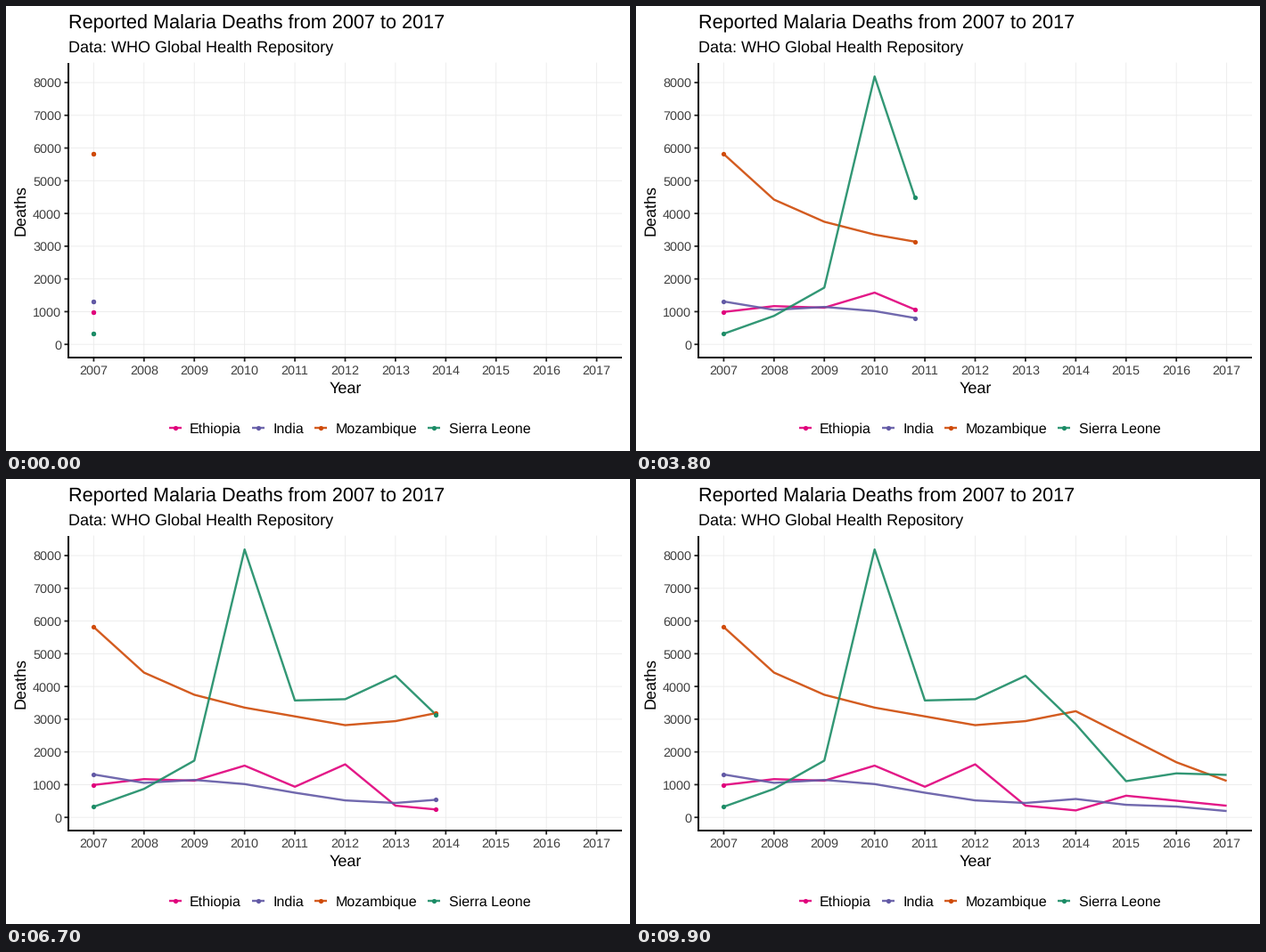
Animation of 700x500 px, one loop 10000 ms. Source, as a matplotlib script:

```python
import matplotlib.pyplot as plt
import numpy as np
from matplotlib.animation import FuncAnimation

W, H, DPI = 700, 500, 100
FRAMES = 100
PT = 72 / DPI  # pixels to points

plt.rcParams["font.family"] = "Liberation Sans"
plt.rcParams["text.hinting"] = "none"

LEFT, RIGHT, TOP, BOTTOM = 70, 691, 63.6, 395
YEARS = np.arange(2007, 2018)
SERIES = {
    "Ethiopia": ("#e0007b", 206.1, [991, 1169, 1121, 1581, 936, 1621, 358,
                                    213, 662, 510, 356]),
    "India": ("#6259a5", 299.6, [1311, 1055, 1144, 1018, 754, 519, 440,
                                 562, 384, 331, 194]),
    "Mozambique": ("#cf4a08", 369.8, [5816, 4424, 3747, 3354, 3086, 2818, 2941,
                                      3245, 2467, 1685, 1114]),
    "Sierra Leone": ("#1c8c66", 496.8, [324, 871, 1734, 8188, 3573, 3611, 4326,
                                        2848, 1107, 1345, 1298]),
}
# Each year is reached on a whole frame.
KNOTS = np.floor(np.arange(len(YEARS)) * (FRAMES - 1) / 10 + 0.5)


def px(year):
    return 98.4 + 56.42 * (np.asarray(year) - 2007)


def py(deaths):
    return 380.2 - 0.03677 * np.asarray(deaths)


fig = plt.figure(figsize=(W / DPI, H / DPI), dpi=DPI, facecolor="white")
ax = fig.add_axes([0, 0, 1, 1])
ax.set(xlim=(0, W), ylim=(H, 0))
ax.axis("off")


def stroke(xs, ys, color, width, **kw):
    kw.setdefault("solid_capstyle", "butt")
    return ax.plot(xs, ys, color=color, lw=width * PT, **kw)[0]


def label(x, y, text, size, color="black", **kw):
    ax.text(x, y, text, fontsize=size * PT, color=color, va="baseline", **kw)


def dot(x, y, color, z=6):
    return ax.plot([x], [y], "o", color=color, ms=5.2 * PT, mew=0, zorder=z)[0]


def trace(xs, ys, color):
    return stroke(xs, ys, color, 2.4, alpha=0.9, zorder=5,
                  solid_joinstyle="round")


GRID, TICK, GREY = "#ebebeb", "#222222", "#404040"
for year in YEARS:
    x = px(year)
    stroke([x, x], [TOP, BOTTOM], GRID, 0.85, zorder=1, snap=False)
    stroke([x, x], [BOTTOM, BOTTOM + 4.5], TICK, 1.8, zorder=2, snap=False)
    label(x, 414, str(year), 14.4, GREY, ha="center")
for deaths in range(0, 8001, 1000):
    y = py(deaths)
    stroke([LEFT, RIGHT], [y, y], GRID, 0.85, zorder=1, snap=False)
    stroke([LEFT - 4.5, LEFT], [y, y], TICK, 1.8, zorder=2, snap=False)
    label(62, y + 5.3, str(deaths), 14.4, GREY, ha="right")

stroke([LEFT, LEFT], [TOP, BOTTOM + 1], "black", 2, zorder=3)
stroke([LEFT - 1, RIGHT], [BOTTOM, BOTTOM], "black", 2, zorder=3)

label(70, 25, "Reported Malaria Deaths from 2007 to 2017", 21.6)
label(70, 51, "Data: WHO Global Health Repository", 18)
label(380.6, 435, "Year", 18, ha="center")
ax.text(21.6, 229.6, "Deaths", fontsize=18 * PT, rotation=90,
        rotation_mode="anchor", ha="center", va="baseline")

lines, tips = [], []
for name, (color, text_x, values) in SERIES.items():
    key_x = text_x - 16.5
    trace([key_x - 6.9, key_x + 6.9], [473.5, 473.5], color)
    dot(key_x, 473.5, color)
    label(text_x, 480, name, 16)

    dot(px(2007), py(values[0]), color)
    lines.append(trace([], [], color))
    tips.append(dot(px(2007), py(values[0]), color, 7))


def update(i):
    now = np.interp(i, KNOTS, YEARS)
    past = YEARS[YEARS < now]
    for line, tip, (_, _, values) in zip(lines, tips, SERIES.values()):
        x, y = px(now), py(np.interp(now, YEARS, values))
        line.set_data(np.append(px(past), x), np.append(py(values[:len(past)]), y))
        tip.set_data([x], [y])
        tip.set_visible(i < FRAMES - 1)
    return lines + tips


anim = FuncAnimation(fig, update, frames=FRAMES, interval=100,
                     repeat=True, repeat_delay=0, blit=False)
plt.show()
```
